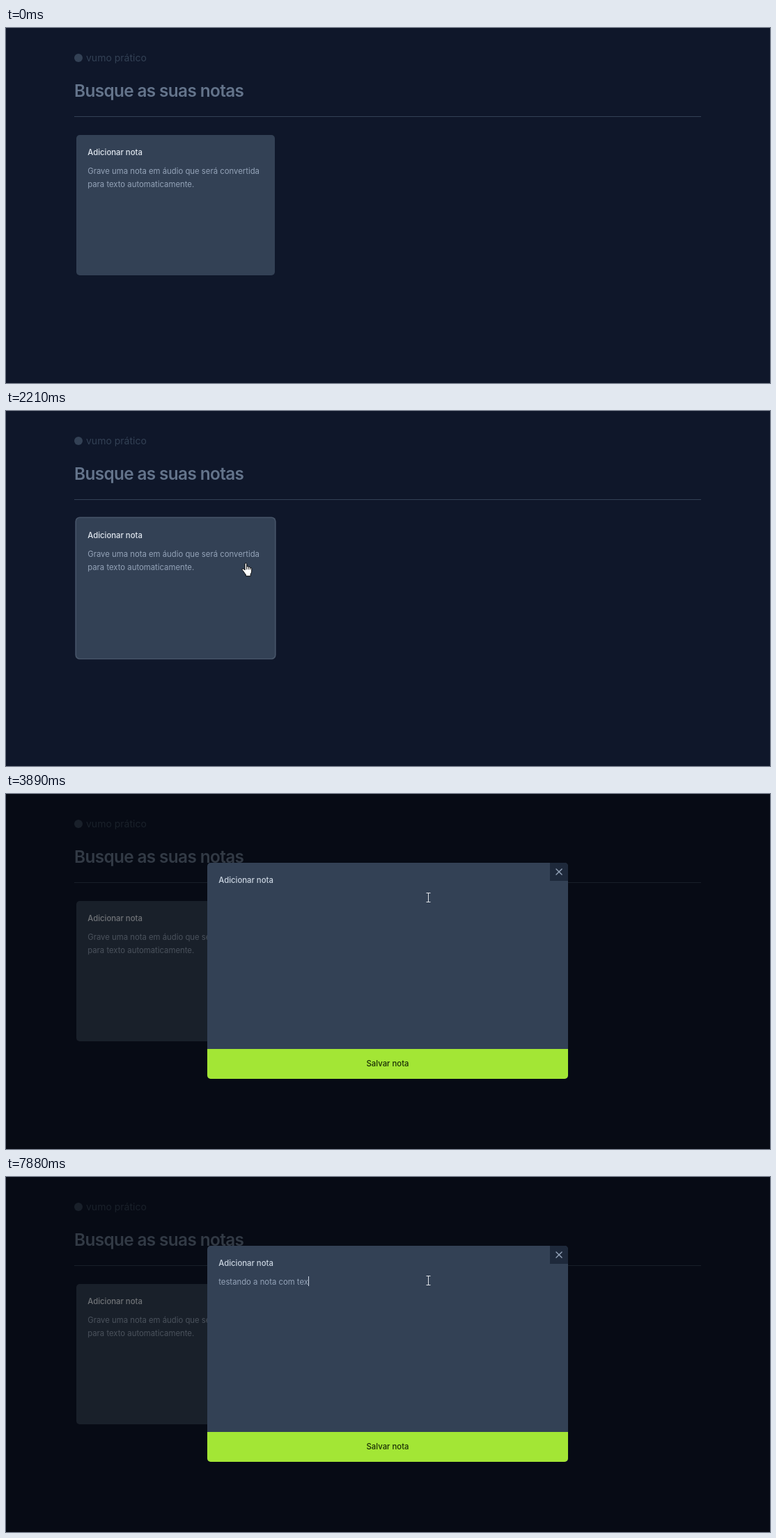
An HTML page for the animation above (8 s loop, 1097 px wide and 511 px high).

```html
<!DOCTYPE html>
<html lang="pt-BR">
<head>
<meta charset="utf-8">
<title>Notas</title>
<style>
  html, body { margin: 0; width: 100%; height: 100%; overflow: hidden; background: #0f172a; }
  #stage {
    position: relative; width: 1097px; height: 511px; overflow: hidden;
    background: #0f172a; color: #94a3b8;
    font: 400 11.34px/19.44px Inter, sans-serif; font-optical-sizing: none;
    -webkit-font-smoothing: antialiased;
  }
  #stage > * { position: absolute; }
  p, h1, h2 { margin: 0; white-space: nowrap; }
  h1 { left: 98px; top: 76.4px; font-size: 24.3px; line-height: 29.2px; font-weight: 600; letter-spacing: -.025em; color: #64748b; }
  h2 { font-size: 11.34px; line-height: 16.2px; font-weight: 500; margin-bottom: 9.7px; }

  .brand { left: 98px; top: 34px; height: 17px; display: flex; align-items: center; gap: 5px; color: #334155; font-size: 14px; line-height: 17px; }
  .brand i { width: 12px; height: 12px; border-radius: 50%; background: currentColor; }
  .rule { left: 98px; top: 127px; width: 900px; height: 1px; background: #334155; }

  .card { left: 101px; top: 154px; width: 285px; height: 202px; box-sizing: border-box; padding: 17px 16.2px; border-radius: 4.9px; background: #334155; }
  .card h2 { color: #e2e8f0; }
  .card.hover { box-shadow: 0 0 0 1.62px #475569; }

  .shade { inset: 0; background: rgba(0, 0, 0, .5); }
  .modal { left: 289px; top: 98.5px; width: 518px; height: 311px; box-sizing: border-box; padding: 17.5px 16.2px; border-radius: 4.9px; overflow: hidden; background: #334155; }
  .modal h2 { color: #cbd5e1; }
  .modal b { font-weight: 500; color: #a3e635; }
  .modal b.hover { text-decoration: underline; }
  .close { position: absolute; right: 0; top: 0; width: 26px; height: 26.5px; background: #1e293b; }
  .close path { stroke: #94a3b8; stroke-width: 1.35; stroke-linecap: round; }
  .save { position: absolute; left: 0; right: 0; bottom: 0; height: 42.4px; line-height: 42.4px; text-align: center; font-weight: 500; background: #a3e635; color: #1a2e05; }
  .note { position: relative; white-space: pre; }
  #caret { position: absolute; top: 1px; width: 1px; height: 14px; background: #cbd5e1; }

  #cursor { left: 0; top: 0; width: 1px; height: 1px; overflow: visible; }
  #cursor g { fill: #fff; stroke: #000; stroke-width: 1.1; stroke-linejoin: round; }
  #cursor .line { fill: none; }
  #cursor .beam { fill: none; stroke: #dfe3e8; stroke-width: 1; }
  [hidden] { display: none !important; }
</style>
</head>
<body>
<div id="stage">
  <div class="brand"><i></i><span>vumo prático</span></div>
  <h1>Busque as suas notas</h1>
  <div class="rule"></div>
  <div class="card" id="card">
    <h2>Adicionar nota</h2>
    <p>Grave uma nota em áudio que será convertida<br>para texto automaticamente.</p>
  </div>

  <div class="shade" id="shade"></div>
  <div class="modal" id="modal">
    <h2>Adicionar nota</h2>
    <p id="prompt">Comece <b>gravando uma nota em áudio</b> ou se preferir <b id="link">utilize apenas texto</b><b>.</b></p>
    <p class="note" id="note"><span id="typed"></span><i id="caret"></i></p>
    <svg class="close" viewBox="0 0 26 26.5"><path d="M9 9l8.1 8.1M17.1 9L9 17.1"/></svg>
    <div class="save">Salvar nota</div>
  </div>

  <svg id="cursor">
    <g id="arrow" transform="scale(.81)">
      <path d="M.5 .5V16.5L4.2 13L6.7 18.7L9.3 17.6L6.8 12H12Z"/>
    </g>
    <g id="hand" transform="scale(.85) translate(-6 .6)">
      <path d="M5.5 2a1.5 1.5 0 0 1 3 0V6.3Q11 5.6 11.5 7.1Q14 6.6 14.4 8.2Q16.8 7.8 16.8 10.2V14.5Q16.8 17 15 19V22.5H7V20Q5 18 3.5 15L.9 12Q.2 10 2 9.9Q3.6 10 5.5 12.4Z"/>
      <path class="line" d="M8.5 6.3V11.5M11.5 7.1V11.5M14.4 8.2V11.5"/>
    </g>
    <g id="beam">
      <path class="beam" d="M-2.5 -6.5H3.5M.5 -6.5V6.5M-2.5 6.5H3.5"/>
    </g>
  </svg>
</div>
<script>
  const LOOP = 8000;
  const OPEN = 2270, WRITE = 3230, FOCUS = 3360, BLINK = 530;
  const TEXT = 'testando a nota com tex';
  const KEYS = [4360, 4420, 4690, 4950, 5150, 5410, 5540, 5670, 5730, 5860, 6010, 6390,
    6450, 6650, 6740, 6800, 7000, 7070, 7140, 7340, 7480, 7540, 7880];

  // time, x, y of the pointer hotspot
  const PATH = [
    [1010, 1012, 467], [1193, 860, 351], [1340, 597, 256], [1480, 418, 225],
    [1620, 376, 220], [1810, 351, 208.5], [1880, 344, 210], [2070, 338.5, 215],
    [2210, 343.5, 218], [2270, 343.5, 218], [2420, 372, 212], [2680, 515, 178],
    [2880, 596, 153], [2950, 608, 150.5], [3020, 606, 148.7]
  ];

  const $ = id => document.getElementById(id);
  const show = (id, on) => $(id).toggleAttribute('hidden', !on);

  function pointAt(t) {
    const i = PATH.findIndex(p => p[0] > t);
    if (i < 0) return PATH[PATH.length - 1].slice(1);
    const [t0, x0, y0] = PATH[Math.max(i - 1, 0)];
    const [t1, x1, y1] = PATH[i];
    const k = t1 > t0 ? Math.max(0, (t - t0) / (t1 - t0)) : 0;
    return [x0 + (x1 - x0) * k, y0 + (y1 - y0) * k];
  }

  // The pointer is seen about fifteen times a second.
  function sampled(t) {
    const [start, step] = t < 1880 ? [1010, 61] : t < OPEN ? [1880, 66] : [OPEN, 68];
    return start + Math.floor((t - start) / step + 1e-6) * step;
  }

  function render(t) {
    const open = t >= OPEN, writing = t >= WRITE, focused = t >= FOCUS;
    const [x, y] = pointAt(sampled(t));
    const onCard = !open && x < 386;
    const onLink = open && !writing && x > 586 && y < 158;

    show('shade', open);
    show('modal', open);
    show('prompt', !writing);
    show('note', writing);
    $('card').classList.toggle('hover', !open && t >= 1690);
    $('link').classList.toggle('hover', onLink);

    const count = KEYS.filter(k => k <= t).length;
    $('typed').textContent = TEXT.slice(0, count);
    show('caret', focused && (count > 0 || t < FOCUS + BLINK));

    const hand = onCard || onLink || (writing && !focused);
    show('cursor', t >= 1010);
    show('hand', hand);
    show('beam', focused);
    show('arrow', !hand && !focused);
    $('cursor').style.transform = focused ? 'translate(606px, 149px)' : `translate(${x}px, ${y}px)`;
  }

  const begin = performance.now();
  function tick() {
    render((performance.now() - begin) % LOOP);
    requestAnimationFrame(tick);
  }
  tick();
</script>
</body>
</html>
```
